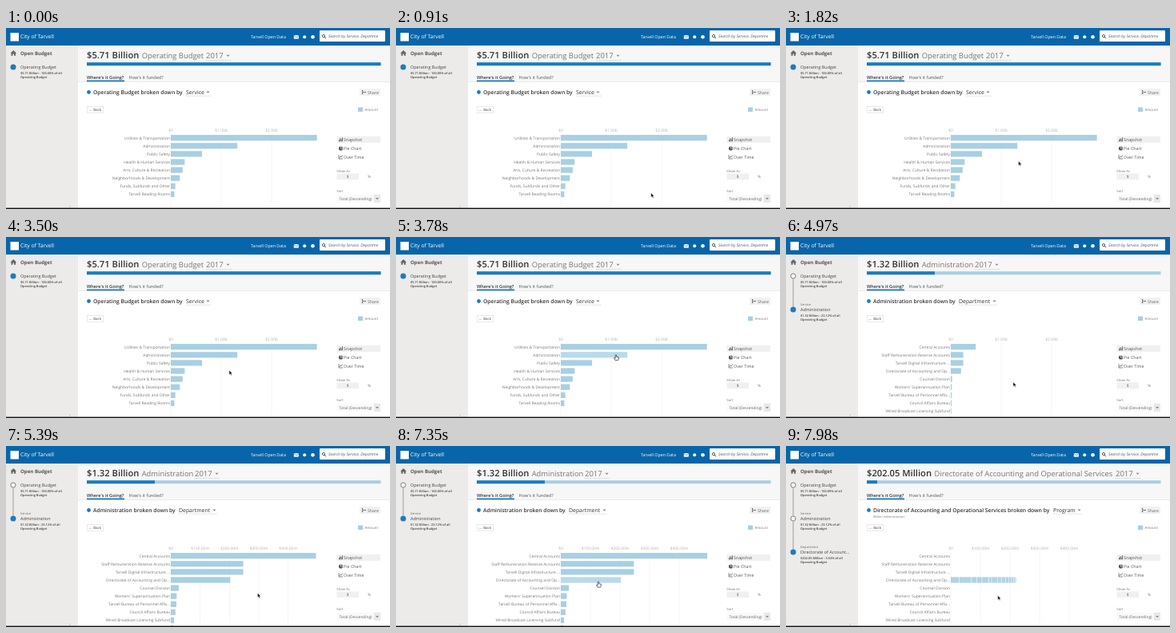
Recreate the animation shown at these times as an HTML page. Size 480x227 px, loop 8 s.

```html
<!DOCTYPE html>
<html lang="en">
<head>
<meta charset="utf-8">
<title>Open Budget</title>
<style>
  html, body { margin: 0; width: 100%; height: 100%; overflow: hidden; background: #fff; }
  svg { display: block; width: 480px; height: 227px; }
  text { font-family: "Open Sans", "Noto Sans", sans-serif; text-rendering: geometricPrecision; white-space: pre; }
</style>
</head>
<body>
<svg id="stage" viewBox="0 0 480 227" xmlns="http://www.w3.org/2000/svg"></svg>
<script>
const LOOP = 8000, LEFT = 206, TOP = 137.7, ROW = 10.1;
const HEADER = '#0965a9', BLUE = '#1c7cbd', PALE = '#a8cfe4', HOVER = '#b9daea';
const DRILL = [3800, 7800], SPLIT = 3990, RESCALE = 4970;
const stage = document.getElementById('stage');

const clamp = v => Math.max(0, Math.min(1, v));
const lerp = (a, b, p) => a + (b - a) * p;
const ease = v => { const p = clamp(v); return p < .5 ? 4 * p ** 3 : 1 - 4 * (1 - p) ** 3; };
const rowY = i => TOP + i * ROW;

const text = (x, y, size, fill, str, extra = '') =>
  `<text x="${x}" y="${y}" font-size="${size}" fill="${fill}" ${extra}>${str.replace(/&/g, '&amp;')}</text>`;
const rect = (x, y, w, h, fill, extra = '') =>
  `<rect x="${x}" y="${y}" width="${w}" height="${h}" fill="${fill}" ${extra}/>`;
const dot = (x, y, r, fill, extra = '') => `<circle cx="${x}" cy="${y}" r="${r}" fill="${fill}" ${extra}/>`;
const path = (d, fill, extra = '') => `<path d="${d}" fill="${fill}" ${extra}/>`;
const line = (d, color, width, extra = '') => path(d, 'none', `stroke="${color}" stroke-width="${width}" ${extra}`);
const caret = (x, y) => path(`M${x - 2} ${y}h4l-2 2.2z`, '#888');
const dotted = (x1, x2, y) => line(`M${x1} ${y}H${x2}`, '#aaa', .6, 'stroke-dasharray="1 1"');
const SEMI = 'font-weight="600"', END = 'text-anchor="end"', MID = 'text-anchor="middle"';

const AGENCY = 'Directorate of Accounting and Operational Services';
const services = {
  names: ['Utilities & Transportation', 'Administration', 'Public Safety', 'Health & Human Services',
    'Arts, Culture & Recreation', 'Neighborhoods & Development', 'Funds, Subfunds and Other', 'Tarvell Reading Rooms'],
  values: [2.9, 1.32, .62, .275, .235, .18, .09, .07]
};
const departments = {
  names: ['Central Accounts', 'Staff Remuneration Reserve Accounts', 'Tarvell Digital Infrastructure ...',
    'Directorate of Accounting and Op...', 'Counsel Division', "Workers' Superannuation Plan",
    'Tarvell Bureau of Personnel Affa...', 'Council Affairs Bureau', 'Wired Broadcast Licensing Subfund'],
  values: [.495, .247, .247, .203, .027, .02, .019, .016, .011, .008, .006, .005]
};
const programs = [10, 15, 6, 6, 8, 3, 7, 4, 5, 3, 3, 2, 1.5, 1];

const levels = [
  { total: '$5.71 Billion', name: 'Operating Budget', nameX: 169.7, yearX: 250, share: 1, by: 'Service', byX: 225, byEnd: 248 },
  { total: '$1.32 Billion', name: 'Administration', nameX: 169.7, yearX: 236, share: .2312, by: 'Department', byX: 216, byEnd: 256 },
  { total: '$202.05 Million', name: AGENCY, nameX: 185.6, yearX: 412, share: .0354, by: 'Program', byX: 334, byEnd: 362 }
];
const trail = [
  ['', 'Operating Budget', '$5.71 Billion - 100.00% of all'],
  ['Service', 'Administration', '$1.32 Billion - 23.12% of all'],
  ['Department', 'Directorate of Account...', '$202.05 Million - 3.54% of all']
];

function frame() {
  const columns = (x, y) => [2, 4, 3, 5].map((h, i) => rect(x + i * 1.3, y - h, .9, h, '#555')).join('');
  return rect(0, 0, 480, 227, '#fff') + rect(90, 22, 390, 45, '#f7f7f7') + rect(90, 67, 390, .6, '#ddd') +
    rect(0, 22, 90, 205, '#ecebe9') + rect(0, 0, 480, 22, HEADER) +
    rect(5.5, 6, 10.5, 10.5, '#fff') + text(18, 13.4, 6.75, '#fff', 'City of Tarvell') +
    text(306, 13, 5.3, '#fff', 'Tarvell Open Data') +
    rect(359.8, 9, 6, 4.6, '#fff') + line('M360 9.4l2.8 2.3 2.8-2.3', HEADER, .7) +
    dot(373.2, 11.2, 2, '#fff') + dot(383.5, 11.2, 2.3, '#fff') +
    rect(392, 3, 82, 14, '#fff', 'rx="1"') +
    dot(397, 10, 1.6, 'none', 'stroke="#333" stroke-width=".8"') + line('M398.1 11.2l1.8 1.9', '#333', 1) +
    text(403, 12.2, 5, '#555', 'Search by Service, Departme', 'font-style="italic"') +
    path('M5.5 31.5L9.3 28l3.8 3.5h-1v3.2h-2v-2.2H8.5v2.2h-2v-3.2z', '#666') +
    text(18, 33.7, 6.1, '#555', 'Open Budget', 'font-weight="700"') +
    text(79, 225, 4, '#999', '«') +
    text(101, 63.8, 5.6, '#333', "Where's it Going?", SEMI) + rect(101, 65.5, 47, 1.8, BLUE) +
    text(153.5, 63.8, 5.6, '#555', "How's it funded?") +
    dot(103.5, 80.5, 2.4, BLUE) +
    rect(442, 76, 26, 9, '#f1f1f1') + text(452, 82.6, 5.2, '#666', 'Share') +
    line('M445.6 78.8v3.4M445.6 80.5h3.4', '#555', .6) +
    dot(445.6, 78.8, .8, '#555') + dot(445.6, 82.2, .8, '#555') + dot(449, 80.5, .8, '#555') +
    rect(101.3, 98.3, 20.4, 8, '#fff', 'stroke="#ddd" stroke-width=".6"') + text(103.5, 104, 4.5, '#444', '← Back') +
    rect(440, 99.5, 6, 5.5, PALE) + text(448.5, 104, 4.4, '#777', 'Amount') +
    rect(413.5, 135.8, 54.5, 8.2, '#f0f0f2') + columns(416, 142.3) + text(422, 142, 5.3, '#555', 'Snapshot') +
    dot(418.5, 151, 2.6, '#555') + line('M418.5 151V148.2M418.5 151H421.2', '#fff', .6) +
    text(422, 153, 5.3, '#555', 'Pie Chart') +
    line('M416 159v5h5M416.7 163l1.3-2 1.2.8 1.8-2.4', '#555', .7) +
    text(422, 164, 5.3, '#555', 'Over Time') +
    text(413.3, 181.2, 4.3, '#777', 'Show As') + rect(413.5, 182.5, 27.5, 7.7, '#f0f0f2') +
    text(427, 188.4, 4.8, '#555', '$', MID) + text(454, 188.4, 4.8, '#777', '%', MID) +
    text(413.3, 205.6, 4.3, '#777', 'Sort') + rect(413.5, 208.8, 54.5, 10.2, '#fafafa') +
    rect(460, 208.8, 8, 10.2, '#e8e8e8') + text(416.5, 215.6, 4.8, '#666', 'Total (Descending)') + caret(464, 213);
}

function sidebar(level) {
  return trail.slice(0, level + 1).map(([kind, name, sub], i) => {
    const y = 49 + i * 42, active = i === level;
    return (active ? '' : line(`M9 ${y + 3.5}v35`, '#888', .8)) +
      (active ? dot(9, y, 3.5, BLUE) : dot(9, y, 3.1, '#f4f4f2', 'stroke="#777" stroke-width=".9"')) +
      text(18, y - 4.6, 3.9, '#666', kind) + text(18, y + 2.1, 5.45, '#444', name) +
      text(18, y + 8.9, 3.9, '#444', sub, SEMI) + text(18, y + 14.2, 3.9, '#444', 'Operating Budget', SEMI);
  }).join('');
}

function headings(level) {
  const l = levels[level];
  return text(101, 38, 11.2, '#333', l.total, SEMI) + text(l.nameX, 38, 9.4, '#777', l.name) +
    text(l.yearX, 38, 9.5, '#777', '2017') + caret(l.yearX + 27.5, 33.7) + dotted(l.yearX, l.yearX + 31, 40.4) +
    rect(101, 43.2, 367.5, 4, PALE) + rect(101, 43.2, 367.5 * l.share, 4, BLUE) +
    text(109, 82.8, 6.75, '#333', l.name + ' broken down by', SEMI) +
    text(l.byX, 82.8, 6.9, '#333', l.by) + caret(l.byEnd + 4.5, 79.6) + dotted(l.byX, l.byEnd + 8, 85.2) +
    (level === 2 ? text(109, 90, 3.9, '#777', 'Within Administration') : '');
}

function axis(scale, swap) {
  const tick = (value, label, alpha) => {
    const x = LEFT + value * scale;
    return `<g opacity="${alpha}">` + rect(x - .3, 132.5, .6, 90, '#eee') +
      text(x, 130.2, 4.9, '#b0b0b0', label, MID) + '</g>';
  };
  return tick(0, '$0', 1) +
    [1, 2].map(v => tick(v, `$${v}.00b`, 1 - swap)).join('') +
    [1, 2, 3, 4].map(v => tick(v / 10, `$${v}00.00m`, swap)).join('');
}

const bar = (x, y, w, alpha = 1, fill = PALE) => rect(x, y - 3.6, w, 7.2, fill, `opacity="${alpha}"`);
const labels = (names, alpha) => `<g opacity="${alpha}">` +
  names.map((n, i) => text(205, rowY(i) + 1.8, 4.9, '#757575', n, END)).join('') + '</g>';

// The pointer rests on a bar shortly before and after each click.
const hovering = t => (t > 3650 && t < 4020) || (t > 7050 && t < 7780);

function chart(t) {
  const swap = ease((t - RESCALE) / 490), scale = lerp(63, 370, swap);
  const relabel = clamp((t - SPLIT) / 180);
  const shade = chosen => chosen && hovering(t) ? HOVER : PALE;
  let out = axis(scale, swap) + labels(services.names, 1 - relabel) + labels(departments.names, relabel);
  if (t < SPLIT) {
    const leave = 1 - clamp((t - DRILL[0]) / 180);
    services.values.forEach((v, i) => {
      if (i !== 1 || t < DRILL[0]) out += bar(LEFT, rowY(i), v * scale, leave, shade(i === 1));
    });
  }
  // Segments of the chosen bar peel off to their own rows.
  if (t >= DRILL[0]) {
    const leave = 1 - clamp((t - DRILL[1]) / 150);
    let offset = 0;
    departments.values.forEach((v, i) => {
      const p = ease((t - SPLIT - 46 * i) / 460);
      if (i !== 3 || t < DRILL[1])
        out += bar(LEFT + offset * (1 - p), lerp(rowY(1), rowY(i), p), v * scale, leave, shade(i === 3 && t > RESCALE));
      offset += v * 63 + 1;
    });
  }
  if (t >= DRILL[1]) {
    let x = LEFT;
    for (const w of programs) { out += bar(x, rowY(3), w, .9); x += w + .55; }
  }
  return out;
}

// Cursor stops: time, x, y
const stops = [[560, 330, 229], [1330, 304, 178], [1800, 290.5, 167], [2100, 290.5, 167], [2870, 279, 167.3],
  [3520, 279, 167.3], [3740, 275, 148], [3990, 275, 149], [4340, 283, 181.5], [4970, 284, 182], [5390, 314.5, 184.6],
  [5670, 314.5, 184.6], [6370, 295, 180], [6650, 295, 180], [7140, 253, 170.5], [7700, 253, 170.5], [7980, 264.7, 187.5]];

function cursor(t) {
  if (t < stops[0][0]) return '';
  const n = stops.findIndex(s => s[0] > t), b = stops[n < 0 ? stops.length - 1 : n], a = n < 0 ? b : stops[n - 1];
  const p = a === b ? 1 : (t - a[0]) / (b[0] - a[0]), q = p * p * (3 - 2 * p);
  const shape = hovering(t)
    ? path('M-.8 0q.8-.8 1.5 0v2.2l2.6.6v2.2l-.8 1.6h-3.4L-2.6 4l.6-.7 1.2.8z', '#fff', 'stroke="#222" stroke-width=".7"')
    : path('M0 0v5.4l1.3-1.1.9 2 1-.5-.9-1.9h1.7z', '#111', 'stroke="#fff" stroke-width=".4"');
  return `<g transform="translate(${lerp(a[1], b[1], q)} ${lerp(a[2], b[2], q)})">${shape}</g>`;
}

const backdrop = frame();
const views = levels.map((_, i) => sidebar(i) + headings(i));
const start = performance.now();

function draw(now) {
  const t = Math.max(0, now - start) % LOOP;
  const level = DRILL.filter(d => t >= d).length;
  stage.innerHTML = backdrop + views[level] + chart(t) + cursor(t) + rect(0, 225.6, 480, 1.4, '#111');
  requestAnimationFrame(draw);
}
draw(start);
</script>
</body>
</html>
```
